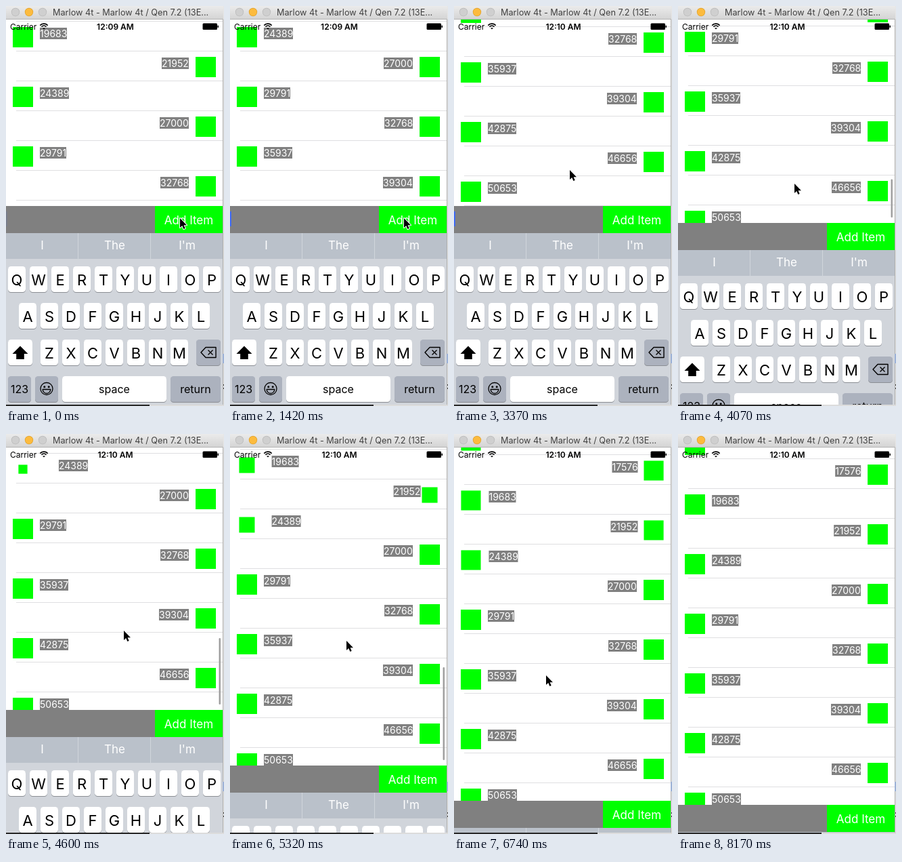
Animation, 322 px wide and 590 px high, one loop 8.27 s. Source, as an HTML page with a canvas:

```html
<!DOCTYPE html>
<html lang="en">
<head>
<meta charset="utf-8">
<title>Chat list with keyboard</title>
<style>
html, body { margin: 0; width: 100%; height: 100%; overflow: hidden; background: #fff; }
canvas { display: block; width: 322px; height: 590px; }
</style>
</head>
<body>
<canvas id="stage"></canvas>
<script>
const W = 322, H = 590, LOOP = 8270, STEP = 177.5;
const GREEN = '#00ff00', GRAY = '#808080';
const ROW = 44, TABLE_TOP = 20, BAR_TOP = 295, BAR_H = 40, KEYBOARD_H = 253;
const DISMISS = 3795, SPRING = 0.001826;
const FONT = 'Inter, "Liberation Sans", sans-serif';

// time, x, y of the pointer tip
const POINTER = [
  [0, 257, 313], [2900, 257, 313], [3190, 204, 326], [3370, 171, 242],
  [3720, 171, 242], [4600, 174, 290], [5320, 172, 305], [6740, 136, 355],
  [7000, 142, 420], [7600, 180, 600]
];

const canvas = document.getElementById('stage');
const ctx = canvas.getContext('2d');
const dpr = window.devicePixelRatio || 1;
canvas.width = Math.round(W * dpr);
canvas.height = Math.round(H * dpr);

const clamp = v => Math.min(1, Math.max(0, v));
const smooth = v => { v = clamp(v); return v * v * (3 - 2 * v); };

function rect(x, y, w, h, color) {
  ctx.fillStyle = color;
  ctx.fillRect(x, y, w, h);
}

function roundRect(x, y, w, h, r, color) {
  ctx.fillStyle = color;
  ctx.beginPath();
  ctx.roundRect(x, y, w, h, r);
  ctx.fill();
}

function disc(x, y, r, color) {
  ctx.fillStyle = color;
  ctx.beginPath();
  ctx.arc(x, y, r, 0, Math.PI * 2);
  ctx.fill();
}

function shape(points, x, y) {
  ctx.beginPath();
  points.forEach(([px, py]) => ctx.lineTo(x + px, y + py));
  ctx.closePath();
}

// y is the middle of the capitals
function text(str, x, y, size, color, align = 'center', weight = 400) {
  ctx.font = `${weight} ${size}px ${FONT}`;
  ctx.textAlign = align;
  ctx.fillStyle = color;
  ctx.fillText(str, x, y + size * 0.364);
}

function pointerAt(t) {
  const i = POINTER.findIndex(p => p[0] > t);
  if (i < 0) return POINTER[POINTER.length - 1].slice(1);
  const [t0, x0, y0] = POINTER[i - 1], [t1, x1, y1] = POINTER[i];
  const u = (t - t0) / (t1 - t0);
  return [x0 + (x1 - x0) * u, y0 + (y1 - y0) * u];
}

function dismissProgress(t) {
  const x = Math.max(0, t - DISMISS) * SPRING;
  return 1 - (1 + x) * Math.exp(-x);
}

// five taps on the button, each scrolling one row
function scrolled(t) {
  let sum = 0;
  for (let i = 0; i < 5; i++) sum += ROW * smooth((t + 85 - i * 4 * STEP) / 320);
  return sum;
}

function drawRow(n, top, s) {
  const label = String(n ** 3), left = n % 2 === 1;
  const size = 30 * s, shift = 50 * (1 - s);
  rect((left ? 25 : 295) - size / 2, top + 24 - size / 2, size, size, GREEN);
  ctx.font = `400 14px ${FONT}`;
  const w = Math.round(ctx.measureText(label).width);
  const x = left ? 50 + shift : 270 + shift - w;
  rect(x, top + 10, w, 17, GRAY);
  text(label, x, top + 18.5, 14, '#fff', 'left');
  rect(15, top + ROW, 305, 1, '#dfdfe1');
}

function drawTable(t, p, barTop, drag) {
  ctx.save();
  ctx.beginPath();
  ctx.rect(0, TABLE_TOP, 320, barTop - TABLE_TOP);
  ctx.clip();
  const base = Math.round(250 - scrolled(t) + drag + (barTop - BAR_TOP));
  for (let n = 24; n <= 37; n++) {
    const top = base + (n - 32) * ROW;
    // rows uncovered by the dismissal grow along with it
    const s = n <= 29 && t > DISMISS ? p : 1;
    if (top > -ROW - 10 && top < barTop) drawRow(n, top, s);
  }
  const alpha = clamp((t - 3700) / 200) * clamp((5900 - t) / 350);
  if (alpha > 0) {
    const h = 98 + (barTop - 407) * 0.476;
    ctx.globalAlpha = alpha;
    roundRect(314.5, barTop - 8 - h, 2.5, h, 1.2, '#a0a0a0');
  }
  ctx.restore();
}

function drawStatus(t) {
  text('Carrier', 6, 30.5, 12, '#000', 'left');
  text(t < 2300 ? '12:09 AM' : '12:10 AM', 161.5, 30.5, 12, '#000', 'center', 600);
  ctx.strokeStyle = '#000';
  ctx.lineWidth = 1.7;
  for (const r of [4.8, 7.8]) {
    ctx.beginPath();
    ctx.arc(56, 34, r, -Math.PI * 0.76, -Math.PI * 0.24);
    ctx.stroke();
  }
  ctx.fillStyle = '#000';
  shape([[0, 0], [-2, -2.2], [2, -2.2]], 56, 34.5);
  ctx.fill();
  roundRect(290.5, 25.5, 21.5, 9.5, 1.5, '#000');
  rect(312.5, 28.7, 1.5, 3.2, '#000');
}

function drawInputBar(t, y) {
  rect(0, y, 220, BAR_H, GRAY);
  rect(220, y, 100, BAR_H, GREEN);
  text('Add Item', 270, y + 20.5, 17, '#fff');
  if (t < DISMISS) {
    const phase = (t / 980) % 1;
    ctx.globalAlpha = phase < 0.15 ? 0.1 : phase < 0.7 ? 1 : 0;
    rect(0, y + 8, 2, 22, '#426bf2');
    ctx.globalAlpha = 1;
  }
}

function key(x, y, w, label, dark, size = 22) {
  roundRect(x, y + 1, w, 38, 4.5, '#8b8e94');
  roundRect(x, y, w, 38, 4.5, dark ? '#acb2be' : '#fff');
  if (label) text(label, x + w / 2, y + 19.5, size, '#000');
}

function drawShift(x, y) {
  ctx.fillStyle = '#000';
  shape([[0, -10], [11.5, 1.5], [5.8, 1.5], [5.8, 9.5], [-5.8, 9.5], [-5.8, 1.5], [-11.5, 1.5]], x, y);
  ctx.fill();
}

function drawDelete(x, y) {
  ctx.strokeStyle = '#000';
  ctx.lineWidth = 1.4;
  ctx.lineJoin = 'round';
  shape([[-11, 0], [-4, -7.5], [11, -7.5], [11, 7.5], [-4, 7.5]], x, y);
  ctx.stroke();
  ctx.beginPath();
  for (const d of [-1, 1]) {
    ctx.moveTo(x - 0.5, y - 3.5 * d);
    ctx.lineTo(x + 6.5, y + 3.5 * d);
  }
  ctx.stroke();
}

function drawSmiley(x, y) {
  ctx.strokeStyle = '#000';
  ctx.lineWidth = 1.3;
  ctx.beginPath();
  ctx.arc(x, y, 9, 0, Math.PI * 2);
  ctx.stroke();
  disc(x - 3.2, y - 2.8, 1.5, '#000');
  disc(x + 3.2, y - 2.8, 1.5, '#000');
  ctx.beginPath();
  ctx.arc(x, y + 1, 5.8, 0, Math.PI);
  ctx.closePath();
  ctx.stroke();
}

function drawKeyboard(y) {
  rect(0, y, 320, 38, '#bac1ca');
  for (const x of [106, 213]) rect(x, y, 1, 38, '#d0d5db');
  ['I', 'The', "I'm"].forEach((word, i) => text(word, 53.5 + i * 107, y + 17.5, 17, '#fff'));
  rect(0, y + 38, 320, 215, '#d1d5db');
  [['QWERTYUIOP', 3], ['ASDFGHJKL', 19], ['ZXCVBNM', 51]].forEach(([row, x], r) => {
    [...row].forEach((c, i) => key(x + i * 32, y + 49 + r * 54, 26, c, false));
  });
  key(3, y + 157, 36);
  drawShift(21, y + 176.5);
  key(281, y + 157, 36, '', true);
  drawDelete(299, y + 176);
  key(3, y + 211, 34, '123', true, 16);
  key(43, y + 211, 34, '', true);
  drawSmiley(60, y + 229.5);
  key(83, y + 211, 154, 'space', false, 16);
  key(243, y + 211, 74, 'return', true, 16);
}

function drawWindow() {
  const g = ctx.createLinearGradient(0, 0, 0, 20);
  g.addColorStop(0, '#ebebeb');
  g.addColorStop(1, '#d3d3d3');
  rect(0, 0, 321, 19, g);
  rect(0, 19, 321, 1, '#b4b4b4');
  [['#b9b9b9', '#cfcfcf'], ['#dfa12c', '#fcbb3e'], ['#b9b9b9', '#cfcfcf']].forEach(([edge, fill], i) => {
    disc(14 + i * 20, 9, 6.2, edge);
    disc(14 + i * 20, 9, 5.5, fill);
  });
  text('Marlow 4t - Marlow 4t / Qen 7.2 (13E...', 69, 9.5, 12.7, '#404040', 'left');
}

function drawSurroundings() {
  rect(320, 20, 1, 568, '#adadad');
  rect(321, 0, 1, H, '#e6e6e6');
  rect(320, 513, 2, 14, '#9db2d6');
  rect(321, 558, 1, 2, '#444');
  rect(321, 563, 1, 2, '#444');
  rect(0, 588, 212, 2, '#2a2a2a');
  rect(212, 588, 110, 2, '#dcdcdc');
}

function drawPointer(x, y) {
  shape([[0, 0], [0, 14], [3.2, 11], [5.4, 16], [7.7, 15], [5.6, 10.2], [10, 10.2]], x, y);
  ctx.lineJoin = 'round';
  ctx.lineWidth = 2;
  ctx.strokeStyle = '#fff';
  ctx.stroke();
  ctx.fillStyle = '#000';
  ctx.fill();
}

function draw(t) {
  const p = dismissProgress(t);
  const barTop = BAR_TOP + Math.round(KEYBOARD_H * p);
  const [px, py] = pointerAt(t);
  const drag = t < 3720 ? 0 : Math.min(18, py - 242);

  ctx.setTransform(dpr, 0, 0, dpr, 0, 0);
  rect(0, 0, W, H, '#fff');
  drawTable(t, p, barTop, drag);
  drawStatus(t);
  drawInputBar(t, barTop);
  drawKeyboard(barTop + BAR_H);
  drawWindow();
  drawSurroundings();
  drawPointer(Math.round(px), Math.round(py));
}

const start = performance.now();
function tick() {
  const t = (performance.now() - start) % LOOP;
  draw(Math.min(46, Math.floor((t + 15) / STEP)) * STEP);
  requestAnimationFrame(tick);
}
tick();
</script>
</body>
</html>
```
